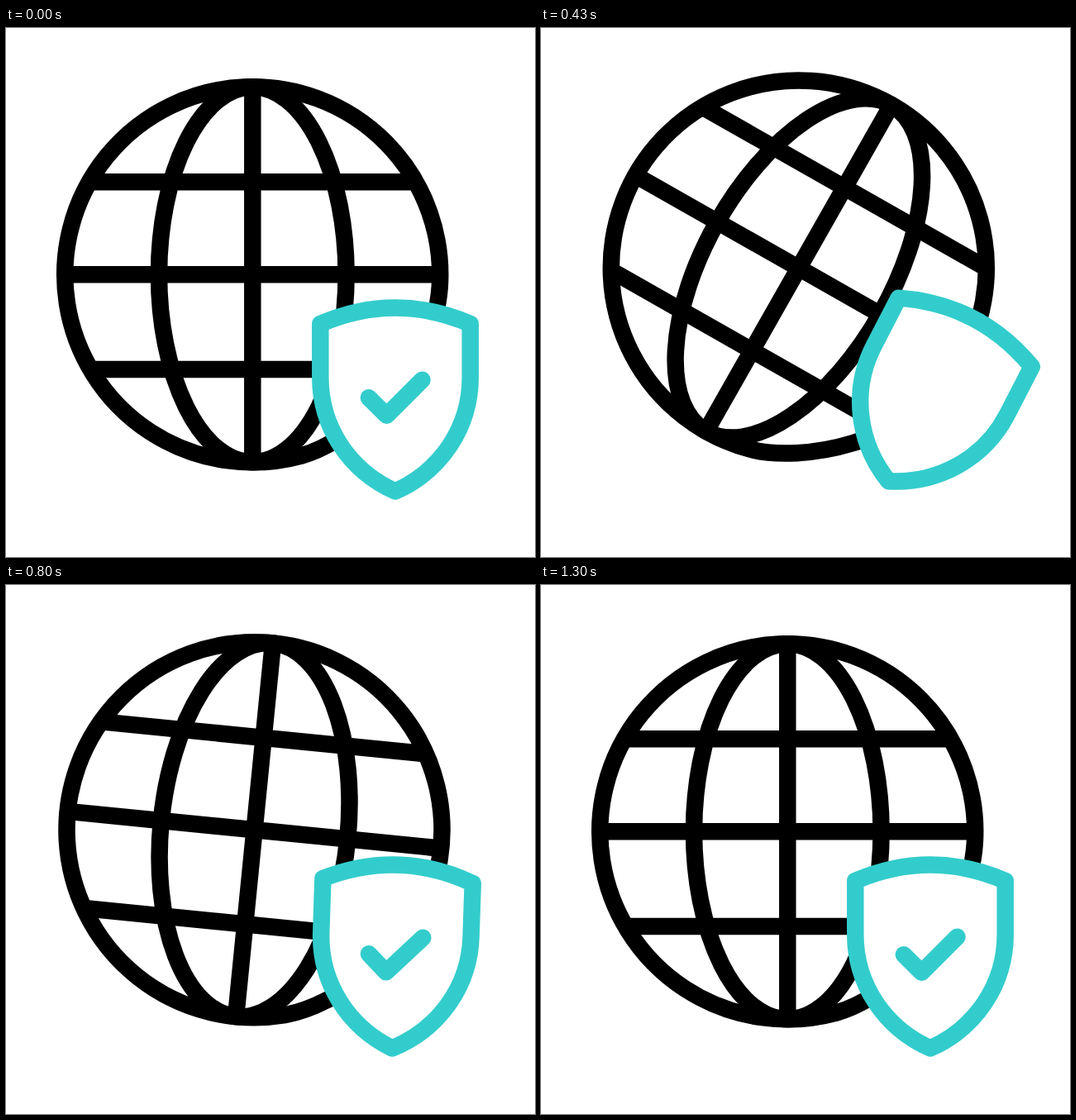
An HTML page that plays this animation: 640x640 px, repeating every 1.67 s.

```html
<!DOCTYPE html>
<html lang="en">
<head>
<meta charset="utf-8">
<title>Secure globe</title>
<style>
  html, body { margin: 0; width: 100%; height: 100%; overflow: hidden; background: #fff; }
  svg { display: block; width: 100%; height: 100%; }
</style>
</head>
<body>
<svg viewBox="0 0 640 640" fill="none" stroke-width="20.5">
  <g id="globe" stroke="#000">
    <g transform="translate(298.3 298.3)">
      <path d="M226.5 14A227 227 0 1 0 59 219.2C117 203 219.5 123 226.5 14Z"/>
      <ellipse rx="113.3" ry="227"/>
      <path d="M0-227V227M-197-112H197M-227 0H227M-196 114.7H196"/>
    </g>
  </g>
  <g id="shield" stroke="#3cc" stroke-linejoin="round" stroke-linecap="round">
    <path fill="#fff" d="M380.3 358Q471 319 561.7 358V423C561.7 483 526 536 471 560.5C416 536 380.3 483 380.3 423Z"/>
    <path id="check" pathLength="1" d="M438.8 447.3L460.5 468.7L503.5 425.7"/>
  </g>
</svg>
<script>
const LOOP = 1670, FPS = 30;
const [globe, shield, check] = ['globe', 'shield', 'check'].map(id => document.getElementById(id));

// Keys are [frame, value]; every span eases in and out.
const globeTurn = [[4, 0], [13, 29.6], [19, -12.2], [25, 7.1], [30.5, -5], [38, 0]];
const shieldTurn = [[0, 0], [13, 27.3], [18.6, -14.8], [26.8, 8.1], [33.5, -2.5], [39, 0]];
const checkDrawn = [[2, 1], [13, 0], [14, 0], [24, 1]];

function valueAt(keys, frame) {
  if (frame <= keys[0][0]) return keys[0][1];
  for (let i = 1; i < keys.length; i++) {
    const [start, from] = keys[i - 1], [end, to] = keys[i];
    if (frame <= end) {
      const u = (frame - start) / (end - start);
      return from + (to - from) * u * u * (3 - 2 * u);
    }
  }
  return keys[keys.length - 1][1];
}

function draw(now) {
  const frame = Math.floor((now % LOOP + 5) * FPS / 1000);
  const drawn = valueAt(checkDrawn, frame);
  globe.setAttribute('transform', `rotate(${valueAt(globeTurn, frame)} 320 320)`);
  shield.setAttribute('transform', `rotate(${valueAt(shieldTurn, frame)} 471 450)`);
  check.setAttribute('stroke-dasharray', drawn < 1 ? `${drawn} 2` : 'none');
  check.setAttribute('visibility', drawn > 0 ? 'visible' : 'hidden');
}

function tick() {
  draw(performance.now());
  requestAnimationFrame(tick);
}
tick();
</script>
</body>
</html>
```
